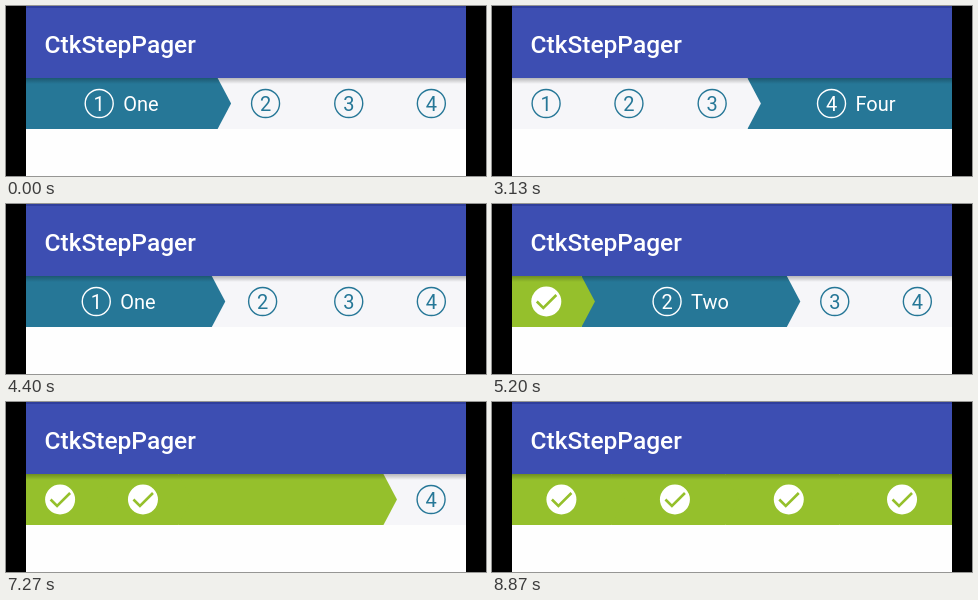
An HTML page with a canvas for the animation above (8.99 s loop, 480x170 px).

```html
<!DOCTYPE html>
<html lang="en">
<head>
<meta charset="utf-8">
<title>Step pager</title>
<style>
  html, body { margin: 0; width: 100%; height: 100%; overflow: hidden; background: #000; }
  canvas { display: block; }
</style>
</head>
<body>
<canvas id="stage" width="480" height="170"></canvas>
<script>
const ctx = document.getElementById('stage').getContext('2d');
const LOOP = 8990, LEFT = 20, RIGHT = 460, TOP = 72, BOTTOM = 123, MID = 97.5, TIP = 13.5;
const LIGHT = [246, 246, 249], TEAL = [38, 119, 151], GREEN = [149, 192, 44], WHITE = [255, 255, 255];
const NAMES = ['One', 'Two', 'Three', 'Four'];
const NARROW = [69, 83.2, 83.2, 82], EXTRA = 122.6;

// Selection changes: start, duration, newly selected step (-1: none, equal widths)
const MOVES = [
  [790, 500, 1], [1990, 500, 2], [2620, 500, 3], [3130, 430, 2], [3550, 420, 1], [3971, 500, 0],
  [4720, 500, 1], [5900, 500, 2], [7250, 500, 3], [8360, 500, -1]
];
// Completion fades for each step: start, duration
const FADES = [[4490, 220], [5370, 430], [6640, 430], [7770, 400]];

const clamp = x => Math.max(0, Math.min(1, x));
const lerp = (a, b, p) => a + (b - a) * p;
const ease = x => (1 - Math.cos(Math.PI * clamp(x))) / 2;
const mix = (a, b, p) => a.map((v, i) => lerp(v, b[i], p));
const rgb = c => `rgb(${c.map(Math.round)})`;

function rect(color, x, y, w, h) {
  ctx.fillStyle = color;
  ctx.fillRect(x, y, w, h);
}

function text(str, x, y, font, color, align = 'left') {
  ctx.font = font + ' Roboto, sans-serif';
  ctx.textAlign = align;
  ctx.fillStyle = color;
  ctx.fillText(str, x, y);
}

function disc(x, r) {
  ctx.beginPath();
  ctx.arc(x, MID, r, 0, 2 * Math.PI);
}

function stepsAt(t) {
  const steps = NAMES.map((name, i) => ({
    name, share: i ? 0 : 1, selected: i ? 0 : 1,
    done: clamp((t - FADES[i][0]) / FADES[i][1])
  }));
  for (const [start, duration, target] of MOVES) {
    const p = ease((t - start) / duration);
    const shown = clamp(p * 1.25 - 0.125);
    steps.forEach((s, i) => {
      const on = i === target ? 1 : 0;
      s.share = lerp(s.share, target < 0 ? 0.25 : on, p);
      s.selected = lerp(s.selected, on, shown);
    });
  }
  let x = LEFT;
  steps.forEach((s, i) => {
    s.start = x;
    s.end = x += NARROW[i] + EXTRA * s.share;
  });
  return steps;
}

function drawCell(s, i) {
  ctx.fillStyle = rgb(mix(mix(LIGHT, TEAL, s.selected), GREEN, s.done));
  ctx.beginPath();
  ctx.moveTo(s.start, TOP);
  ctx.lineTo(s.end, TOP);
  if (i < 3) ctx.lineTo(s.end + TIP, MID);
  ctx.lineTo(s.end, BOTTOM);
  ctx.lineTo(s.start, BOTTOM);
  ctx.fill();
}

function drawContent(s, i) {
  const center = (s.start + (i ? TIP : 0) + s.end) / 2 - 0.4;
  if (s.done < 1) {
    const ink = rgb(mix(TEAL, WHITE, s.selected));
    ctx.font = '20px Roboto, sans-serif';
    const x = center - s.selected * (ctx.measureText(s.name).width + 9) / 2;
    ctx.globalAlpha = 1 - s.done;
    ctx.strokeStyle = ink;
    ctx.lineWidth = 1.4;
    disc(x, 14);
    ctx.stroke();
    text(i + 1, x, 105, '20px', ink, 'center');
    ctx.globalAlpha *= s.selected;
    text(s.name, x + 24, 105, '20px', '#fff');
  } else {
    ctx.globalAlpha = 1 - s.selected;
    ctx.fillStyle = '#fff';
    disc(center, 15);
    ctx.fill();
    ctx.strokeStyle = rgb(GREEN);
    ctx.lineWidth = 2.6;
    ctx.beginPath();
    ctx.moveTo(center - 9.5, 97.5);
    ctx.lineTo(center - 3, 104);
    ctx.lineTo(center + 10, 91);
    ctx.stroke();
  }
  ctx.globalAlpha = 1;
}

function draw(t) {
  const width = RIGHT - LEFT;
  rect('#000', 0, 0, 480, 170);
  rect('#fefefe', LEFT, 0, width, 170);

  const steps = stepsAt(t);
  for (let i = 3; i >= 0; i--) drawCell(steps[i], i);
  steps.forEach(drawContent);

  const shadow = ctx.createLinearGradient(0, TOP, 0, TOP + 6);
  shadow.addColorStop(0, 'rgba(0,0,0,.26)');
  shadow.addColorStop(1, 'rgba(0,0,0,0)');
  rect(shadow, LEFT, TOP, width, 6);

  rect('#3d4eb2', LEFT, 0, width, TOP);
  rect('#303f9c', LEFT, 0, width, 2);
  text('CtkStepPager', 38.5, 47, '500 24.5px', '#fff');
}

const begin = performance.now();
function frame() {
  draw((performance.now() - begin) % LOOP);
  requestAnimationFrame(frame);
}
frame();
</script>
</body>
</html>
```
